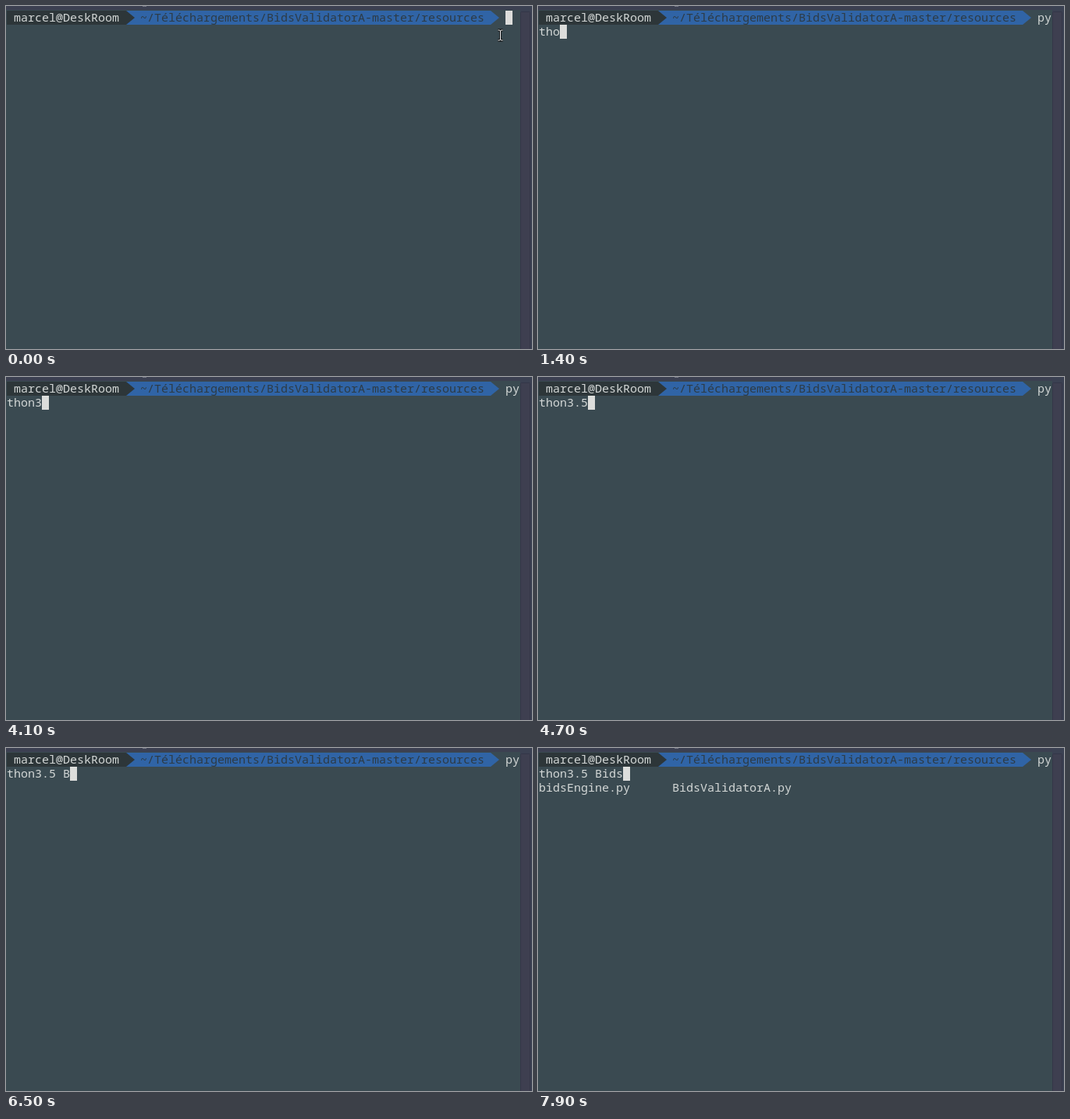
An HTML page for the animation above (8000 ms loop, 674 by 440 pixels).

```html
<!DOCTYPE html>
<html lang="fr">
<head>
<meta charset="utf-8">
<title>Terminal</title>
<style>
  html, body { margin: 0; width: 100%; height: 100%; overflow: hidden; background: #3a4a51; }
  svg { display: block; }
  text { font: 300 15px "Noto Sans Mono", "Liberation Mono", monospace; fill: #d3d7d6; white-space: pre; }
</style>
</head>
<body>
<svg width="674" height="440" viewBox="0 0 674 440">
  <rect width="674" height="440" fill="#3a4a51"/>
  <!-- window edge and scrollbar -->
  <rect width="674" height="5" fill="#3c4051"/>
  <path d="M175 0h5" stroke="#a9acb5"/>
  <rect x="659" width="15" height="440" fill="#3b4152"/>
  <rect x="659.5" y="7.5" width="12" height="440" rx="1" fill="#3e3f50" stroke="#343648"/>
  <!-- prompt -->
  <path d="M154 6H621L632 15L621 24H154Z" fill="#3064a6"/>
  <path d="M1 6H154L165 15L154 24H1Z" fill="#2d3639"/>
  <text x="10" y="20">marcel@DeskRoom</text>
  <text x="172" y="20" style="fill:#2d3b46">~/Téléchargements/BidsValidatorA-master/resources</text>
  <!-- typed text and output -->
  <text id="head" x="640" y="20"></text>
  <text id="tail" x="1" y="38"></text>
  <g id="listing">
    <text x="1" y="56">bidsEngine.py</text>
    <text x="172" y="56">BidsValidatorA.py</text>
  </g>
  <rect id="cursor" width="9" height="18" fill="#dcdddb"/>
  <g id="pointer" fill="none">
    <path id="beam" d="M-3 -6.5H-1L0 -5.5L1 -6.5H3M0 -5.5V5.5M-3 6.5H-1L0 5.5L1 6.5H3" stroke="#15191b" stroke-width="3"/>
    <use href="#beam" style="stroke:#fff"/>
    <path d="M-3 -6.5H-1L0 -5.5L1 -6.5H3M0 -5.5V5.5M-3 6.5H-1L0 5.5L1 6.5H3" stroke="#f4f4f4" stroke-width="1"/>
  </g>
</svg>
<script>
const LOOP = 8000, CELL = 9, ROW = 18, WRAP = 2;
const command = "python3.5 Bids";
const keyTimes = [700, 1000, 1200, 1300, 1400, 3100, 4100, 4300, 4700, 6000, 6500, 7500, 7600, 7700];
const blinkOff = [[200, 700], [2000, 2600], [5300, 5900], [7000, 7500]];
const pointerPath = [[0, 633.5, 37.5], [100, 617.5, 50.5], [200, 600.5, 61.5]];

const $ = id => document.getElementById(id);
const show = (id, on) => $(id).setAttribute("visibility", on ? "visible" : "hidden");

function draw(t) {
  const typed = keyTimes.filter(k => k <= t).length;
  $("head").textContent = command.slice(0, Math.min(typed, WRAP));
  $("tail").textContent = command.slice(WRAP, Math.max(typed, WRAP));

  const wrapped = typed >= WRAP;
  $("cursor").setAttribute("x", wrapped ? 1 + (typed - WRAP) * CELL : 640 + typed * CELL);
  $("cursor").setAttribute("y", wrapped ? 6 + ROW : 6);
  show("cursor", !blinkOff.some(([from, to]) => t >= from && t < to));

  const [, x, y] = pointerPath.filter(p => p[0] <= t).pop();
  $("pointer").setAttribute("transform", `translate(${x} ${y})`);
  show("pointer", t < keyTimes[0]);
  show("listing", t >= 7900);
}

const start = performance.now();
function tick() {
  draw((performance.now() - start) % LOOP);
  requestAnimationFrame(tick);
}
draw(0);
requestAnimationFrame(tick);
</script>
</body>
</html>
```
